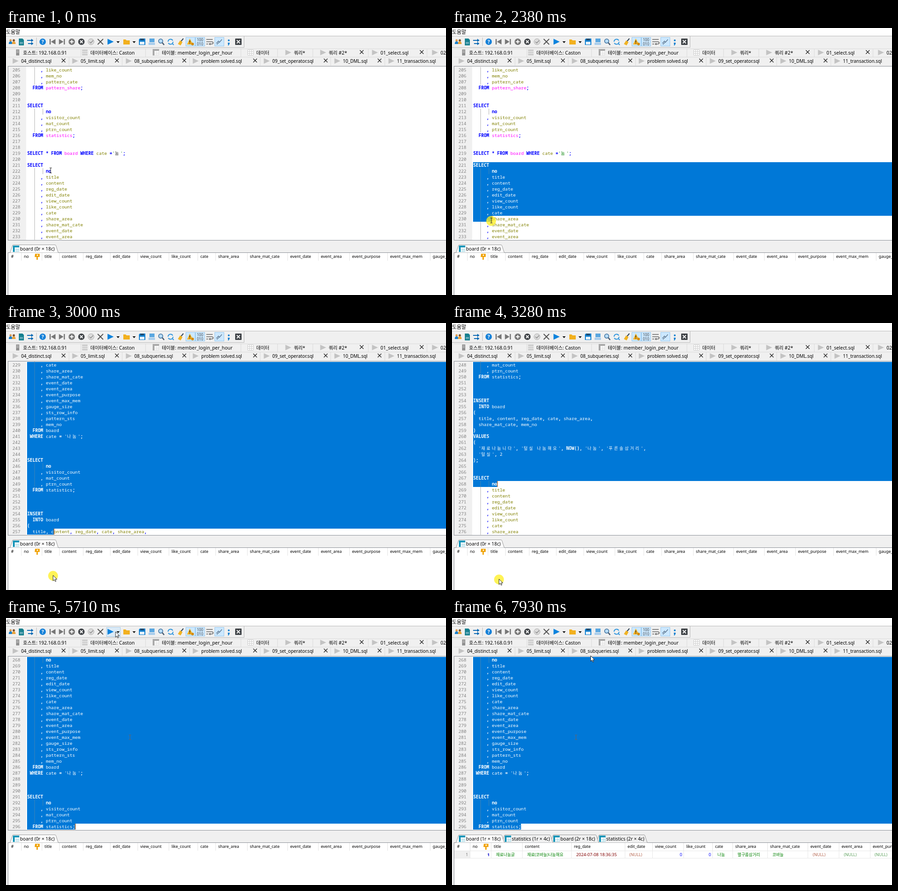
An HTML page for the animation above (7990 ms loop, 960x583 px).

```html
<!DOCTYPE html>
<html lang="ko">
<head>
<meta charset="utf-8">
<title>SQL editor</title>
<style>
  html, body { margin: 0; width: 100%; height: 100%; overflow: hidden; background: #f0f0f0; }
  svg { display: block; width: 960px; height: 583px; }
  text { font-family: 'Noto Sans', 'Noto Sans CJK KR', 'Noto Sans CJK', sans-serif; }
  .mono text { font-family: 'Noto Sans Mono', 'Noto Sans CJK KR', 'Noto Sans CJK', monospace; font-size: 9.67px; font-weight: 500; }
  .mono .ko { font-size: 9px; }
  .num { fill: #808080; }
  .kw { fill: #00f; }
  .mono .kw, .mono .sym { font-weight: 700; }
  .sym { fill: #00f; }
  .id { fill: #808000; }
  .tbl { fill: #f0f; }
  .str { fill: #008000; }
  .lit { fill: #800080; }
  .guide { stroke: #b4b4b4; }
  .picked text { fill: #fff; }
  .picked .guide { stroke: #3c83b8; }
  .row1 { font-size: 10.4px; }
  .row2 { font-size: 10px; }
  .pane { font-size: 10.3px; }
  .grid { font-size: 8.9px; }
  .dark { fill: #3f4347; }
  .toggle { fill: #cce8ff; stroke: #99c9ee; }
</style>
</head>
<body>
<svg viewBox="0 0 960 583">
  <defs>
    <clipPath id="view"><rect x="5" y="84" width="955" height="378.5"/></clipPath>
    <clipPath id="selection"><path id="selectionShape"/></clipPath>
    <g id="close"><path d="M-4-4L4 4M4-4L-4 4" stroke="#222" stroke-width="1.3"/></g>
    <path id="query" d="M-6-6L7 0L-6 6Z" fill="#c3c3c3"/>
    <g id="table">
      <rect x="-6.500" y="-6.500" width="13" height="13" fill="#fff"/>
      <path d="M-2.500 2H6.500M2-2.500V6.500M-2.500 6H6.500M6-2.500V6.500" stroke="currentColor" opacity=".45"/>
      <path d="M-7-7H7V-3H-3V7H-7Z" fill="currentColor"/>
    </g>
    <g id="key" fill="#f0a30a"><path d="M-5-6h10v7h-4v6h-3V1h-4Z"/><circle cy="-3" r="1.500" fill="#fff"/></g>
    <path id="drop" d="M-3.500-2h7L0 2Z" fill="#111"/>
  </defs>

  <rect width="960" height="583" fill="#f0f0f0"/>
  <rect width="960" height="17" fill="#fff"/>
  <text x="0" y="13" font-size="11.2">도움말</text>
  <path d="M0 17.500H960M0 42.500H519.500V18" fill="none" stroke="#b8b8b8"/>

  <g id="toolbar" fill="none">
    <g fill="#1b7fcb"><circle cx="10" cy="27" r="2.500" fill="#d99a4e"/><path d="M6 35q0-6 4-6t4 6Z"/>
      <circle cx="17" cy="27" r="2.500" fill="#7a5230"/><path d="M13 35q0-6 4-6t4 6Z" fill="#e8a33a"/></g>
    <path d="M28 23h8l3 3v12H28Z" fill="#16808f"/><path d="M30 31.500h7M30 34h7" stroke="#cde"/>
    <path d="M46 27h10M48 34h10" stroke="#0b69b4" stroke-width="2"/>
    <path d="M55 23.500l5 3.500-5 3.500ZM55 30.500l5 3.500-5 3.500Z" fill="#0b69b4"/>
    <path d="M66.500 21V39" stroke="#bbb"/>
    <circle cx="80" cy="30" r="7" fill="#1681d8"/>
    <text x="77.500" y="34" font-size="11" font-weight="700" fill="#fff">?</text>
    <g fill="#777"><path d="M95 24h2.500v12H95ZM108 24v12l-10-6Z"/><path d="M126 24h2.500v12H126ZM115.500 24v12l10-6Z"/></g>
    <circle cx="143.500" cy="30" r="7" fill="#777"/><path d="M139.500 30h8M143.500 26v8" stroke="#fff" stroke-width="2"/>
    <circle cx="164.500" cy="30" r="7" class="dark"/><path d="M161.500 27l6 6M167.500 27l-6 6" stroke="#fff" stroke-width="1.800"/>
    <circle cx="185.500" cy="30" r="6.500" fill="#ddd" stroke="#aaa"/><path d="M182 30l3 3 5-6" stroke="#888" stroke-width="1.500"/>
    <path d="M200 24l12 12M212 24l-12 12" stroke="#555" stroke-width="2"/>
    <rect id="hover" x="219.500" y="20.500" width="30" height="20" fill="#dcebf7" stroke="#a9cdea"/>
    <path d="M221.500 23.500L235 30l-13.500 6.500Z" fill="#0d83dd"/>
    <use href="#drop" x="244.500" y="31"/>
    <path d="M256 25h5l2 2h7v9h-14Z" fill="#f2b01e"/>
    <use href="#drop" x="279.500" y="31"/>
    <path d="M290 25l2-2h12v14h-14Z" fill="#1180d0"/><path d="M293 23.500h8v3h-8Z" fill="#23415c"/><path d="M292 30h10v6h-10Z" fill="#e8f3fb"/>
    <path d="M313 23h11v8h-11Z" fill="#5aa7e0"/><path d="M311 32h14v5h-14Z" fill="#a9cdec"/>
    <circle cx="337.500" cy="28.500" r="4.500" fill="#b8dcf5" stroke="#356b9c" stroke-width="1.500"/><path d="M341 32l4 5" stroke="#44586c" stroke-width="2.500"/>
    <circle cx="359" cy="30" r="5.500" stroke="#2d94dd" stroke-width="2" stroke-dasharray="14 3"/><path d="M363 34l3 3" stroke="#2d94dd" stroke-width="2"/>
    <path d="M387 23l-5 6" stroke="#345" stroke-width="2"/><path d="M380 27l5 4-4 7-6-3Z" fill="#f0b323"/>
    <rect x="392.500" y="20.500" width="20" height="19" class="toggle"/>
    <path d="M401 23l7 13h-13Z" fill="#f5b01d"/><path d="M401 27v5M401 33v1.500" stroke="#333" stroke-width="1.500"/><circle cx="407" cy="35" r="3" fill="#d38c13"/>
    <rect x="413.500" y="20.500" width="20" height="19" class="toggle"/>
    <g class="dark" font-size="8"><text x="416.500" y="29">100</text><text x="416.500" y="37.500">010</text></g>
    <path d="M437 25h14M437 30h11q4 0 4 2.500t-4 2.500h-4M437 35h4" stroke="#666" stroke-width="1.600"/><path d="M446 32.500v5l-4-2.500Z" fill="#666"/>
    <rect x="455.500" y="20.500" width="20" height="19" class="toggle"/>
    <path d="M459 33.500l4.500-5 2.500 2.500 5-6M460 36l5-5" stroke="#59718a" stroke-width="1.300"/>
    <g fill="#1180d0"><circle cx="486" cy="27" r="2"/><path d="M484 32h4v2l-2 4h-2l1-3h-1Z"/></g>
    <rect x="500" y="23" width="14" height="14" rx="1" class="dark"/><path d="M503.500 26.500l7 7M510.500 26.500l-7 7" stroke="#fff" stroke-width="1.800"/>
  </g>

  <g id="tabs">
    <path d="M4 45.500H960M4 63.500H960M163.500 46V63M304.500 46V63M512.500 46V63M592.500 46V63M669.500 46V63M790.500 46V63M918.500 46V63M137.500 64V82M253.500 64V82M400.500 64V82M554.500 64V82M708.500 64V82M826.500 64V82" stroke="#dadada" fill="none"/>
    <path d="M22 47h7v13h-7Z" fill="#909090"/><path d="M23 50h5M23 53h5" stroke="#ddd"/>
    <path d="M166 47h12v13h-12Z" fill="#cfcfcf"/><path d="M166 51.500h12M166 55.500h12" stroke="#f0f0f0"/>
    <use href="#table" x="327" y="53" color="#aaa"/>
    <path d="M527.500 47.500h12v12h-12ZM531.500 47.500v12M535.500 47.500v12M527.500 51.500h12M527.500 55.500h12" fill="#fff" stroke="#ccc"/>
  </g>

  <rect x="4.500" y="83.500" width="960" height="380" fill="#fff" stroke="#8b8f96"/>
  <rect x="5" y="84" width="39" height="379" fill="#f0f0f0"/>
  <g clip-path="url(#view)">
    <g id="code" class="mono"></g>
    <g clip-path="url(#selection)">
      <rect x="46" y="84" width="914" height="379" fill="#0078d7"/>
      <g id="picked" class="mono picked"></g>
    </g>
    <rect id="caret" width="1.300" height="13" fill="#9a521c"/>
  </g>

  <rect x="4.500" y="490.500" width="960" height="100" fill="#fff" stroke="#8b8f96"/>
  <g id="before"></g>
  <g id="after"></g>

  <path id="trail" d="M268 255.500h5M270.500 255.500v10M268 265.500h5" stroke="#5f6670" fill="none"/>
  <g id="pointer">
    <circle id="press" r="10.700" cy="1" fill="#ffef1f" opacity=".75"/>
    <path id="arrow" d="M0 0V12L2.800 9.400 4.700 13.600 6.600 12.800 4.700 8.700H8.500Z" fill="#fff" stroke="#111" stroke-width=".9"/>
    <path id="beam" d="M-2-5.500H3M.5-5.500V5.500M-2 5.500H3" stroke="#333" fill="none"/>
  </g>
</svg>

<script>
const LOOP = 7990, FIRST = 205, ROW = 13, TOP = 85, LEFT = 46, COL = 5.8;
const $ = id => document.getElementById(id);
const label = (x, y, s, attrs = '') => `<text x="${x}" y="${y}" ${attrs}>${s}</text>`;
const use = (id, x, y, attrs = '') => `<use href="#${id}" x="${x}" y="${y}" ${attrs}/>`;
const show = (id, on) => $(id).style.display = on ? '' : 'none';

// Editor tabs
const tabRow = (cls, y, tabs) => tabs.map(([x, name, icon, close]) =>
  (icon ? use('query', x - 12.5, y - 4) : '') + label(x, y, name, `class="${cls}"`) +
  (close ? use('close', close, y - 5) : '')).join('');
$('tabs').innerHTML += tabRow('row1', 57.5, [
  [37, '호스트: 192.168.0.91'], [184, '데이터베이스: Caston'], [340, '테이블: member_login_per_hour'],
  [546, '데이터'], [628, '쿼리*', 1], [704, '쿼리 #2*', 1, 776], [817, '01_select.sql', 1, 907], [948, '02', 1]
]) + tabRow('row2', 76, [
  [33, '04_distinct.sql', 1, 125.5], [163, '05_limit.sql', 1, 242], [280, '08_subqueries.sql', 1, 389],
  [426, 'problem solved.sql', 1, 543.5], [581, '09_set_operator.sql', 1, 697.5],
  [735, '10_DML.sql', 1, 815], [853, '11_transaction.sql', 1]
]);

// Listing
const columns = ('no title content reg_date edit_date view_count like_count cate share_area share_mat_cate ' +
  'event_date event_area event_purpose event_max_mem gauge_size sts_row_info pattern_sts mem_no').split(' ');
const item = name => '     , ' + name;
const select = ([first, ...rest], table) =>
  ['SELECT', '       ' + first, ...rest.map(item), '  FROM ' + table];
const statistics = select(['no', 'visitor_count', 'mat_count', 'ptrn_count'], 'statistics;');
const board = [...select(columns, 'board'), " WHERE cate = '나눔';", '', '', ''];
const listing = [
  ...['like_count', 'mem_no', 'pattern_cate'].map(item), '  FROM pattern_share;', '', '',
  ...statistics, '', '', "SELECT * FROM board WHERE cate ='눔';", '',
  ...board, ...statistics, '', '', '',
  'INSERT', '  INTO board', '(', '  title, content, reg_date, cate, share_area,',
  '  share_mat_cate, mem_no', ')', 'VALUES', '(',
  "  '재료나눕니다', '털실 나눔해요', NOW(), '나눔', '푸른솔삼거리',", "  '털실', 2", ');', '', '',
  ...board, ...statistics
];

const isHangul = c => c >= '가' && c <= '힣';
const kind = s =>
  /^(SELECT|FROM|WHERE|INSERT|INTO|VALUES|NOW|no)$/.test(s) ? 'kw' :
  /^(board|statistics|pattern_share)$/.test(s) ? 'tbl' :
  /^[a-z]/.test(s) ? 'id' : /^\d/.test(s) ? 'lit' : /^'/.test(s) ? 'str' : 'sym';

function codeLine(src, i) {
  const y = TOP + 10 + ROW * i, top = TOP + ROW * i;
  let out = label(14, y, FIRST + i, 'class="num"'), col = 0;
  const at = () => (LEFT + .3 + COL * col).toFixed(1);
  const guide = x => `<path class="guide" d="M${x} ${top}v${ROW}"/>`;
  if (/^ {5}/.test(src)) out += guide(62.5);
  if (/^ {7}/.test(src)) out += guide(80.5);
  for (const token of src.match(/'[^']*'|\w+|\s+|[^\w\s]/g) || []) {
    const cls = kind(token);
    if (cls !== 'str') {
      if (token.trim()) out += label(at(), y, token, `class="${cls}"`);
      col += token.length;
      continue;
    }
    // Hangul takes two cells
    for (const c of token) {
      const wide = isHangul(c);
      out += label(at(), y, c, `class="str${wide ? ' ko' : ''}"`);
      col += wide ? 2 : 1;
    }
  }
  return out;
}
$('code').innerHTML = $('picked').innerHTML = listing.map(codeLine).join('');
const composing = $('code').querySelector('.ko');

// Result panes
const pane = (x, w, name, active) =>
  `<path d="M${x - 3} 490.500l5-15q.5-2 2-2h${w - 9}q1.500 0 2 2l5 15" fill="${active ? '#fff' : '#f0f0f0'}" stroke="#999"/>` +
  use('table', x + 10, 482, 'color="#1795b8"') + label(x + 18.5, 486, name, 'class="pane"');
const header = (hashEdge, keyX, xs) =>
  `<g class="grid">${label(11, 502, '#')}${use('key', keyX, 499)}` +
  xs.map((x, i) => label(x, 502, columns[i]) +
    `<path d="M${x - 5.5} 491v17" stroke="#e3e3e3"/>`).join('') + '</g>';
const cell = (x, s, color, attrs = '') => label(x, 520, s, `fill="${color}" ${attrs}`);
const right = 'text-anchor="end"';

$('before').innerHTML = pane(12, 100, 'board (0r × 18c)', true) + header(33, 68.5,
  [39, 84, 122, 174, 233, 293, 361, 424, 463, 532, 620, 687, 755, 838, 931]);

const wideXs = [45, 91, 159, 266, 383, 443, 511, 574, 618, 694, 782, 850, 918];
$('after').innerHTML =
  pane(318, 106, 'statistics (2r × 4c)') + pane(218, 100, 'board (2r × 18c)') +
  pane(112, 106, 'statistics (1r × 4c)') + pane(12, 100, 'board (1r × 18c)', true) +
  '<rect x="5" y="508" width="34" height="16" fill="#f0f0f0"/>' + header(39, 74.5, wideXs) +
  `<path d="M5 508.500H960M5 524.500H960${wideXs.map(x => `M${x - 5.5} 508v16`).join('')}" stroke="#e8e8e8"/>` +
  '<g class="grid">' +
  cell(35, 1, '#777', right) + cell(82, 1, '#0000c8', right + ' font-weight="700"') +
  cell(96, '재료나눔글', '#008000') + cell(164, '재료(코바늘)나눔해요', '#008000') +
  cell(271, '2024-07-08 18:36:35', '#800000', 'font-size="9.400"') + cell(387, '(NULL)', '#b5654f') +
  cell(502, 0, '#0000ff', right) + cell(565, 0, '#0000ff', right) +
  cell(579, '나눔', '#008000') + cell(623, '별구름삼거리', '#008000') + cell(699, '코바늘', '#008000') +
  cell(787, '(NULL)', '#b5654f') + cell(855, '(NULL)', '#5ca05c') + cell(922, '(NULL)', '#5ca05c') + '</g>';

// Motion: [time, x, y]
const path = [
  [0, 97, 311], [70, 97, 311], [400, 62, 302], [580, 36, 295], [760, 48.5, 298], [1300, 48.5, 298],
  [1500, 62, 299], [1700, 44.5, 295.5], [2030, 44.5, 295.5], [2100, 46, 299], [2450, 95, 450],
  [2600, 104, 554], [2790, 103, 534.5], [2860, 103, 534.5], [3070, 102.5, 559], [3540, 102.5, 559],
  [3620, 102.5, 553], [3760, 102.5, 553], [4020, 118.5, 530.5], [4080, 118.5, 530.5], [4290, 167, 498],
  [4640, 167, 498], [4950, 270, 261], [5200, 430, 30], [5300, 400, 8], [5400, 279, 26], [5510, 239, 30],
  [6300, 239, 30], [6920, 262, 74], [7320, 262, 74], [7900, 302.5, 82.5], [LOOP, 302.5, 82.5]
];
// [time, first visible line, row of the selection end if not the pointer's]
const scroll = [
  [0, 205], [2590, 206], [2650, 207], [2720, 208], [2790, 209], [2860, 212], [2930, 220], [3000, 229],
  [3070, 238], [3220, 244], [3280, 248, 20], [3340, 254], [3410, 258], [3550, 264], [3620, 268]
];
const latest = (steps, t) => steps.filter(s => s[0] <= t).pop();

function pointerAt(t) {
  const i = path.findIndex(p => p[0] > t), [t0, x0, y0] = path[i - 1], [t1, x1, y1] = path[i];
  const k = (t - t0) / (t1 - t0);
  return [x0 + (x1 - x0) * k, y0 + (y1 - y0) * k];
}

function drawSelection(t) {
  const [, top, fixedRow] = latest(scroll, t);
  const shift = `translate(0 ${(FIRST - top) * ROW})`;
  $('code').setAttribute('transform', shift);
  $('picked').setAttribute('transform', shift);
  const [px, py] = pointerAt(Math.min(t, 4290));
  const row = fixedRow ?? Math.max(0, Math.min(28, Math.floor((py - TOP) / ROW)));
  const length = listing[top + row - FIRST].length;
  const col = Math.max(0, Math.min(length, Math.round((px - LEFT) / COL)));
  const x = LEFT + .2 + col * COL, y = TOP + row * ROW;
  const start = Math.max(TOP, TOP + (221 - top) * ROW);
  $('selectionShape').setAttribute('d', t < 2100 ? '' :
    `M${LEFT} ${start}H960V${y}H${x}V${y + ROW}H${LEFT}Z`);
  $('caret').setAttribute('x', x);
  $('caret').setAttribute('y', y);
  show('caret', t >= 2100 && t < 4900 || t >= 5450 && t < 6030);
}

function draw() {
  const t = performance.now() % LOOP, [x, y] = pointerAt(t);
  drawSelection(t);
  composing.style.fill = t < 2100 ? '#222' : '';
  const inText = x > 46 && y > 84 && y < 463;
  $('pointer').setAttribute('transform', `translate(${x} ${y})`);
  show('beam', inText);
  show('arrow', !inText);
  show('press', t >= 1700 && t < 4490);
  show('trail', t >= 4950);
  show('hover', t >= 5510 && t < 7400);
  show('before', t < 7400);
  show('after', t >= 7400);
  requestAnimationFrame(draw);
}
draw();
</script>
</body>
</html>
```
